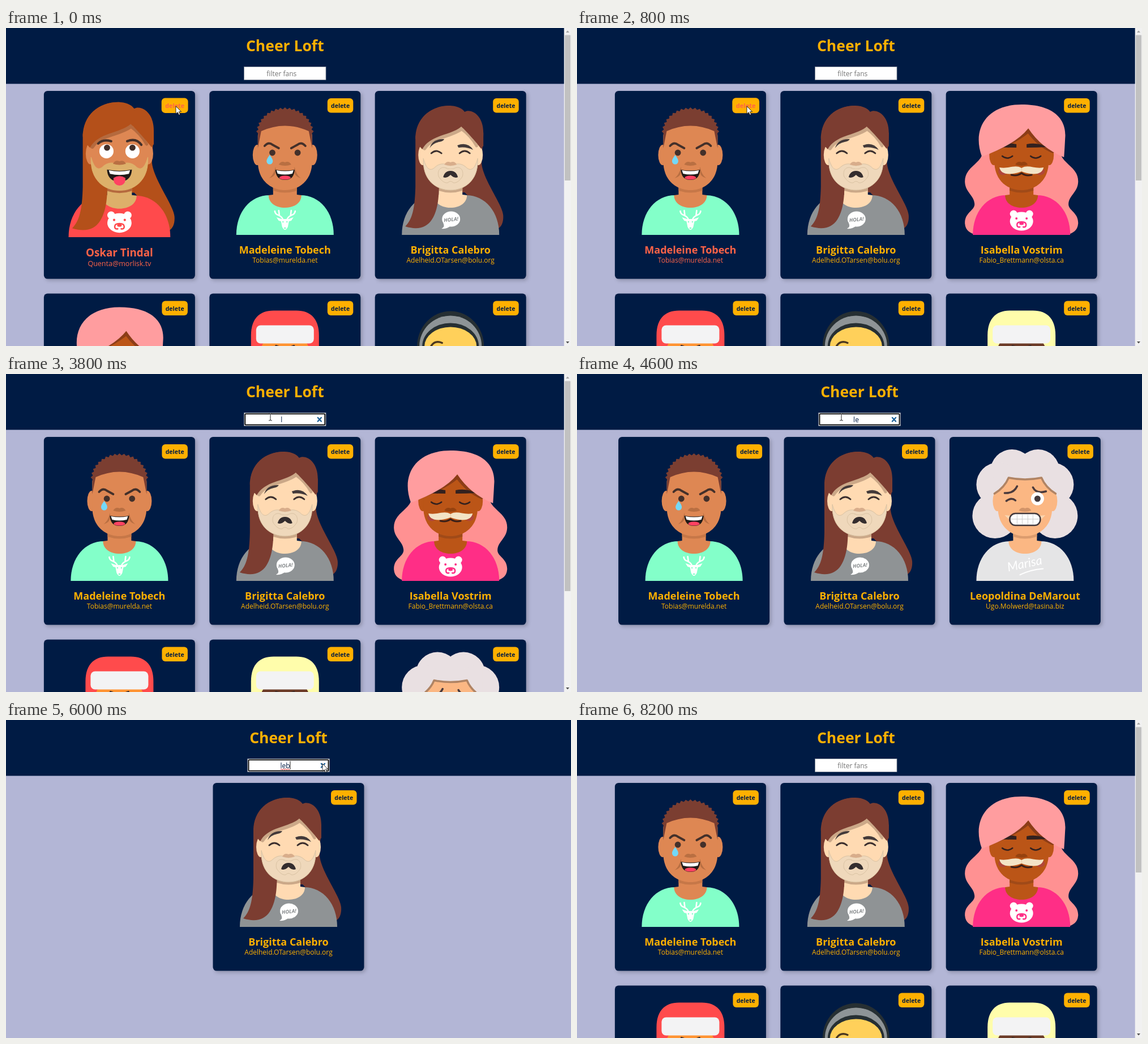
Recreate the animation shown at these times as an HTML page. Size 998 by 561 pixels, loop 9.2 s.

```html
<!DOCTYPE html>
<html lang="en">
<head>
<meta charset="utf-8">
<title>Cheer Loft</title>
<style>
  html, body { margin: 0; width: 100%; height: 100%; overflow: hidden; background: #b3b6d6; }
  svg { display: block; width: 100%; height: 100%; font-family: "Open Sans", "Noto Sans", sans-serif; }
  .card { filter: drop-shadow(3.2px 3.2px 3.2px rgba(0, 0, 0, .2)); }
</style>
</head>
<body>
<svg id="stage" viewBox="0 0 998 561"></svg>
<script>
const LOOP = 9200, STEP = 200;
const NAVY = '#001b44', AMBER = '#ffb000', TOMATO = '#ff6347', INK = '#43302a';

const shape = (fill, d) => `<path fill="${fill}" d="${d}"/>`;
const line = (color, width, d) =>
  `<path fill="none" stroke="${color}" stroke-width="${width}" stroke-linecap="round" stroke-linejoin="round" d="${d}"/>`;
const dot = (fill, x, y, rx, ry = rx) => `<ellipse fill="${fill}" cx="${x}" cy="${y}" rx="${rx}" ry="${ry}"/>`;
const box = (fill, x, y, w, h, r = 0, extra = '') =>
  `<rect fill="${fill}" x="${x}" y="${y}" width="${w}" height="${h}" rx="${r}" ${extra}/>`;
const text = (s, x, y, size, fill, weight = 400, extra = '') =>
  `<text x="${x}" y="${y}" font-size="${size}" fill="${fill}" font-weight="${weight}" text-anchor="middle" ${extra}>${s}</text>`;
const mirror = s => `${s}<g transform="scale(-1 1)">${s}</g>`;
const zoom = (s, x, y, k) => `<g transform="translate(${x} ${y}) scale(${k}) translate(${-x} ${-y})">${s}</g>`;

// Avatars: x is measured from the card centre, y from the top of the page.
const body = (skin, shade, shirt) =>
  shape(shirt, 'M-86 365C-86 325-62 295-27 295H27C62 295 86 325 86 365Z') +
  shape(skin, 'M-29 295C-29 309-16 317 0 317S29 309 29 295L21 294V265H-21V294Z') +
  shape(shade, 'M-21 276H21V287Q0 294-21 287Z');

const head = skin => dot(skin, -49, 224, 8, 18) + dot(skin, 49, 224, 8, 18) +
  shape(skin, 'M-48 190C-48 165 48 165 48 190V235C48 270 24 286 0 286S-48 270-48 235Z');

const nose = color => shape(color, 'M-11 241Q-7 234 0 237Q7 234 11 241Q0 245-11 241Z');

const bear = ink => mirror(dot('#fff', 14, 328, 6.5)) + dot('#fff', 0, 341, 20.5, 16.5) +
  mirror(dot(ink, 9, 336, 2)) + line(ink, 2.5, 'M-8 347Q-8 342 0 342T8 347Q8 352 3 351M-8 347Q-8 352-3 351') +
  dot(ink, 0, 345, 4, 2.5);

const deer = ink => shape('#fff', 'M-6 337L-15 334L-11 340L-7 341L-5 351Q0 361 5 351L7 341L11 340L15 334L6 337Z') +
  mirror(line('#fff', 2.6, 'M4 337C8 328 17 332 18 323M10 330L11 322') + dot(ink, 3.5, 342, 1.3)) + dot(ink, 0, 353, 2, 1.3);

const beard = (fill, edge) => `<g stroke="${edge}" stroke-width="1">${shape(fill,
  'M-48 230C-44 245-38 254-29 247C-18 236-8 240 0 243C8 240 18 236 29 247C38 254 44 245 48 230V235C48 270 24 286 0 286S-48 270-48 235Z')}</g>`;

const longHair = (hair, skin, shade, neck, shirt, face, print) =>
  shape(hair, 'M-62 195C-62 160-36 137 0 137L58 185C58 205 55 215 55 240C58 268 92 312 93 330C94 342 90 350 85 353L25 290H-20Z') +
  body(neck, shade, shirt) + print +
  shape(hair, 'M-62 190V280C-63 320-68 338-80 350C-58 357-42 352-33 338C-20 318-21 290-20 275L-35 230Z') +
  head(skin) + line(shade, 7, 'M19 178C-2 193-33 191-46 212') + line(shade, 5, 'M19 178Q36 190 46 208') + face +
  shape(hair, 'M19 174C0 190-36 188-50 214L-57 206L-61 235V195C-62 160-36 137-2 137C10 137 20 141 25 148C35 142 58 152 58 185V208L54 213C44 200 30 184 19 174Z');

const tongueOut = longHair('#b4501a', '#de8753', '#b56a3e', '#ddb06a', '#ff4a4c',
  mirror(dot('#fff', 22, 220, 12)) + dot(INK, -21, 214, 5.2) + dot(INK, 22, 214, 5.2) +
  line(INK, 4, 'M-36 207Q-28 199-14 203M13 203Q28 197 37 209') +
  beard('#ddb06a', '#ddb06a') + nose('#b96f42') +
  shape('#1f1a18', 'M-21 251Q0 255 21 251Q20 271 0 271T-21 251Z') +
  shape('#fff', 'M-18 252Q0 256 18 252L16 258Q0 262-16 258Z') +
  shape('#ff4262', 'M-10 265Q0 259 10 265V268A10 10 0 0 1-10 268Z'), bear('#ff4a4c'));

const frowning = longHair('#7c3d31', '#ffdab2', '#cba888', '#ffdab2', '#8f9395',
  line('#3b2f2e', 2.8, 'M-34 221Q-25 213-16 221M16 221Q25 213 34 221') +
  shape('#433a3a', 'M-37 212Q-32 195-11 196Q-13 200-20 201Q-31 203-37 212ZM12 207Q30 200 40 215Q28 209 14 211Z') +
  beard('#efd8bb', '#d9c2a2') + nose('#d8ad8b') +
  line('#d9c2a2', 1, 'M-8 247C-18 243-24 252-21 262C-16 270-10 274-5 273Q0 268 5 273C10 274 16 270 21 262C24 252 18 243 8 247Q0 251-8 247Z') +
  shape('#342d2e', 'M-13 263Q-10 252 0 252T13 263Q7 266 0 259Q-7 266-13 263Z'),
  dot('#fff', 1, 337, 16, 13.5) + shape('#fff', 'M-13 344Q-9 351-16 354Q-6 355 0 349Z') +
  text('HOLA!', 1, 341, 9, '#85898b', 700, 'transform="rotate(-6 1 338)" font-style="italic"'));

const spiky = (() => {
  const tips = Array.from({ length: 39 }, (_, i) => {
    const a = Math.PI * i / 38, r = i % 2 ? 1.02 : .95;
    return `${(-50 * r * Math.cos(a)).toFixed(1)} ${(186 - 45 * r * Math.sin(a)).toFixed(1)}`;
  }).join('L');
  return shape('#7b3e31', `M-48 212L${tips}L48 212L42 182Q0 163-42 182Z`);
})();

const crying = body('#de8753', '#c67748', '#83ffc9') + deer('#83ffc9') + head('#de8753') + spiky +
  mirror(line(INK, 3.8, 'M-36 208Q-29 200-22 206L-11 212') + dot(INK, 22.3, 220, 5.4) +
    shape('#b96f42', 'M17 245Q19 258 28 265Q13 261 17 245Z')) +
  nose('#b96f42') +
  shape('#1f1a18', 'M-17 250Q0 253 17 250Q16 268 0 268T-17 250Z') +
  shape('#fff', 'M-15 251Q0 254 15 251L13 257Q0 260-13 257Z') + dot('#ff4262', 0, 264, 10, 3.6) +
  shape('#74d9f8', 'M-27 224Q-21 232-21.500 235A5.500 5.500 0 0 1-32.500 235Q-33 232-27 224Z');

const moustached = mirror(shape('#ff9192',
  'M0 190H-72L-70 225C-78 242-101 248-100 272C-99 290-84 295-83 310C-82 322-101 325-100 345C-99 358-90 362-80 365H0Z')) +
  body('#bb5517', '#a04a18', '#ff2e86') + bear('#ff2e86') + head('#bb5517') +
  line('#8c3d17', 7, 'M-55 217Q-10 200 12 181Q32 208 55 217') +
  mirror(shape('#33211f', 'M9 205Q28 201 45 210Q28 211 9 211Z') + line('#33211f', 2.600, 'M-34 226Q-25 233-16 226') +
    dot('#b1463a', 33, 253, 8, 6.5)) +
  nose('#96420f') + line('#3a1f18', 3, 'M-18 259Q-8 262 0 256Q8 262 18 259') +
  mirror(shape('#f3e4c6', 'M0 247C12 240 22 249 39 246C36 261 16 259 0 253Z')) +
  shape('#ff9d9f', 'M-70 227C-88 178-62 135 0 135C62 135 80 165 77 195Q76 215 75 228Q35 212 12 177Q-10 205-70 227Z');

const curly = mirror(dot('#e9e0e2', 23, 171, 38) + dot('#e9e0e2', 47, 195, 39) + dot('#e9e0e2', 53, 250, 40)) +
  body('#fbb783', '#dc9c6e', '#e5e5e6') + head('#fbb783') +
  shape('#e9e0e2', 'M-56 210V165H56V210Q36 200 29 182Q0 188-29 182Q-36 200-56 210Z') +
  line('#b08464', 3.500, 'M-54 211Q-36 200-29 183Q0 189 29 183Q36 200 54 211') +
  line('#4a3a3c', 3.500, 'M-36 210Q-20 211-14 198M14 200Q20 212 37 207M-33 224Q-24 217-17 223') +
  dot('#fff', 22, 220, 11.500) + dot('#43393c', 22, 220, 5.500) + nose('#d29469') +
  mirror(shape('#fbd6b0', 'M26 250L36 249L28 257Z')) +
  box('#fff', -27, 246, 54, 21, 10, 'stroke="#42393d" stroke-width="2.500"') +
  line('#ccc', 1, 'M-25 256H25M-14 248V265M-5 248V265M5 248V265M14 248V265') +
  `<g transform="rotate(-12 0 338)">${text('Marisa', 0, 342, 22, '#fff', 400, 'font-style="italic" style="font-family:Lato,cursive"')}
  ${line('#fff', 2, 'M-12 352Q8 347 30 350')}</g>`;

const capped = (cap, skin) =>
  shape(cap, 'M-60 260V185C-60 155-45 141-20 141H20C45 141 60 155 60 185V260Z') +
  box(skin, -42, 190, 84, 90, 20) + box('#f3f3f4', -51, 167, 102, 32, 8) +
  line(INK, 3, 'M-16 203L-8 206M16 203L8 206');

const hooded = dot('#262f33', 0, 204, 59, 62) + dot('#8e9497', 0, 204, 55, 54) + dot('#262f33', 0, 204, 50, 41) +
  dot('#ffd05a', 0, 204, 46, 34) + line('#4a3720', 3.500, 'M-34 203Q-27 193-15 198');

const fans = [
  ['Oskar Tindal', 'Quenta@morlisk.tv', tongueOut],
  ['Madeleine Tobech', 'Tobias@murelda.net', crying],
  ['Brigitta Calebro', 'Adelheid.OTarsen@bolu.org', frowning],
  ['Isabella Vostrim', 'Fabio_Brettmann@olsta.ca', moustached],
  ['Wilma Horst', '', capped('#ff4b4c', '#ff9433')],
  ['Dora Kemp', '', hooded],
  ['Paul Ostend', '', capped('#fffdab', '#6c3c28')],
  ['Leopoldina DeMarout', 'Ugo.Molwerd@tasina.biz', curly],
];

const typed = t => t < 3000 || t >= 6400 ? '' : t < 4200 ? 'l' : t < 5000 ? 'le' : 'leb';
const caretHidden = t => [[3800, 4200], [4600, 5000], [5600, 6000], [7000, 7600]].some(([a, b]) => t >= a && t < b);

function pointer(t) {
  if (t < 1600) return { x: 300, y: 138 };
  if (t < 2600) {
    const k = (t - 1400) / 1200, bend = (a, b, c) => a * (1 - k) ** 2 + 2 * b * k * (1 - k) + c * k * k;
    return { x: bend(300, 830, 467), y: bend(138, 220, 76) };
  }
  if (t < 6400) {
    const k = Math.min(1, Math.max(0, (t - 5000) / 1000));
    return { x: 467 + 92 * k, y: 76 + k, beam: t < 6000 };
  }
  if (t < 8000) return { x: 560, y: 78, beam: true };
  return t < 8200 ? { x: 893, y: 136 } : null;
}

function drawPointer({ x, y, beam }) {
  const art = beam
    ? line('#fff', 2.500, 'M0-5V5') + line('#222', 1, 'M-2.500-6H-1L0-5L1-6H2.500M0-5V5M-2.500 6H-1L0 5L1 6H2.500')
    : `<g stroke="#000" stroke-width=".8">${shape('#fff', 'M0 0V13.500L3.200 10.500L5.400 15.500L7.600 14.500L5.500 9.700H9.600Z')}</g>`;
  return `<g transform="translate(${x} ${y})">${art}</g>`;
}

function card([name, mail, avatar], cx, dy, mouse, t) {
  const over = mouse && t < 2600 && dy === 0 && Math.abs(mouse.x - cx) < 133 && mouse.y > 111;
  const pressing = mouse && dy === 0 && Math.abs(mouse.x - cx - 97.8) < 23 && Math.abs(mouse.y - 137) < 13;
  const color = over ? TOMATO : AMBER;
  const grow = t >= 400 ? 1 : t ? 1.05 : 1.045;
  const content = avatar + text(name, 0, 398, 18, color, 700) + text(mail, 0, 414, 12, color);
  const button = box(AMBER, 75, 124, 45.5, 25.5, 6) + text('delete', 97.8, 141, 10.5, pressing ? TOMATO : NAVY, 700);
  return `<g transform="translate(${cx} ${dy})">${box(NAVY, -133.5, 111, 267, 331.5, 6.4, 'class="card"')}
    ${over ? zoom(content, 0, 276.5, grow) : content}
    ${pressing ? zoom(button, 97.8, 136.8, t ? 1.05 : 1.03) : button}</g>`;
}

function searchBox(mid, query, t) {
  const focused = t >= 2600 && t < 8000, x = mid - 6;
  const width = { '': 0, l: 3, le: 10, leb: 17 }[query];
  let s = box('#fff', mid - 72.2, 68.5, 144.4, 23, 0, 'stroke="#8a8f9c" stroke-width=".8"');
  if (focused) s += box('#fff', mid - 70.5, 70.3, 141, 19.4, 1, 'stroke="#000" stroke-width="1.800"');
  s += query ? text(query, x, 84.5, 12, NAVY) : text('filter fans', x, 84.5, 12, '#757575');
  if (query) s += line('#1f6299', 2.4, `M${mid + 58} 77l6 6.500m0-6.500l-6 6.500`);
  if (query === 'leb') s += line('#e33', 1, `M${x - 8} 87q1-2 2 0t2 0t2 0t2 0t2 0t2 0t2 0t2 0`);
  if (focused && !caretHidden(t)) s += box('#000', x + width / 2, 72.5, .9, 14.5);
  return s;
}

function scrollBar(thumbEnd) {
  return box('#f1f1f1', 985.7, 0, 12.3, 561) + box('#c1c1c1', 987, 12.5, 10, thumbEnd - 12.5) +
    shape('#a3a3a3', 'M989 8L992 4.500L995 8Z') + shape('#505050', 'M989 553L992 556.500L995 553Z');
}

function scene(t) {
  const query = typed(t), mouse = pointer(t), scrolls = query.length < 2, mid = scrolls ? 492.8 : 499;
  const shown = fans.slice(t < 400 ? 0 : 1).filter(([name]) => name.toLowerCase().includes(query)).slice(0, 6);
  const columns = Math.min(3, shown.length);
  return box('#b3b6d6', 0, 0, 998, 561) + box(NAVY, 0, 0, 998, 98.5) +
    text('Cheer Loft', mid, 41, 26.5, AMBER, 700) + searchBox(mid, query, t) +
    shown.map((fan, i) =>
      card(fan, mid + (i % 3 - (columns - 1) / 2) * 292.4, Math.floor(i / 3) * 357.5, mouse, t)).join('') +
    (scrolls ? scrollBar(query ? 383 : 269) : '') + (mouse ? drawPointer(mouse) : '');
}

const stage = document.getElementById('stage');
const start = performance.now();
let shownStep = -1;
function tick() {
  const step = Math.floor((performance.now() - start) % LOOP / STEP);
  if (step !== shownStep) stage.innerHTML = scene((shownStep = step) * STEP);
  requestAnimationFrame(tick);
}
tick();
</script>
</body>
</html>
```
